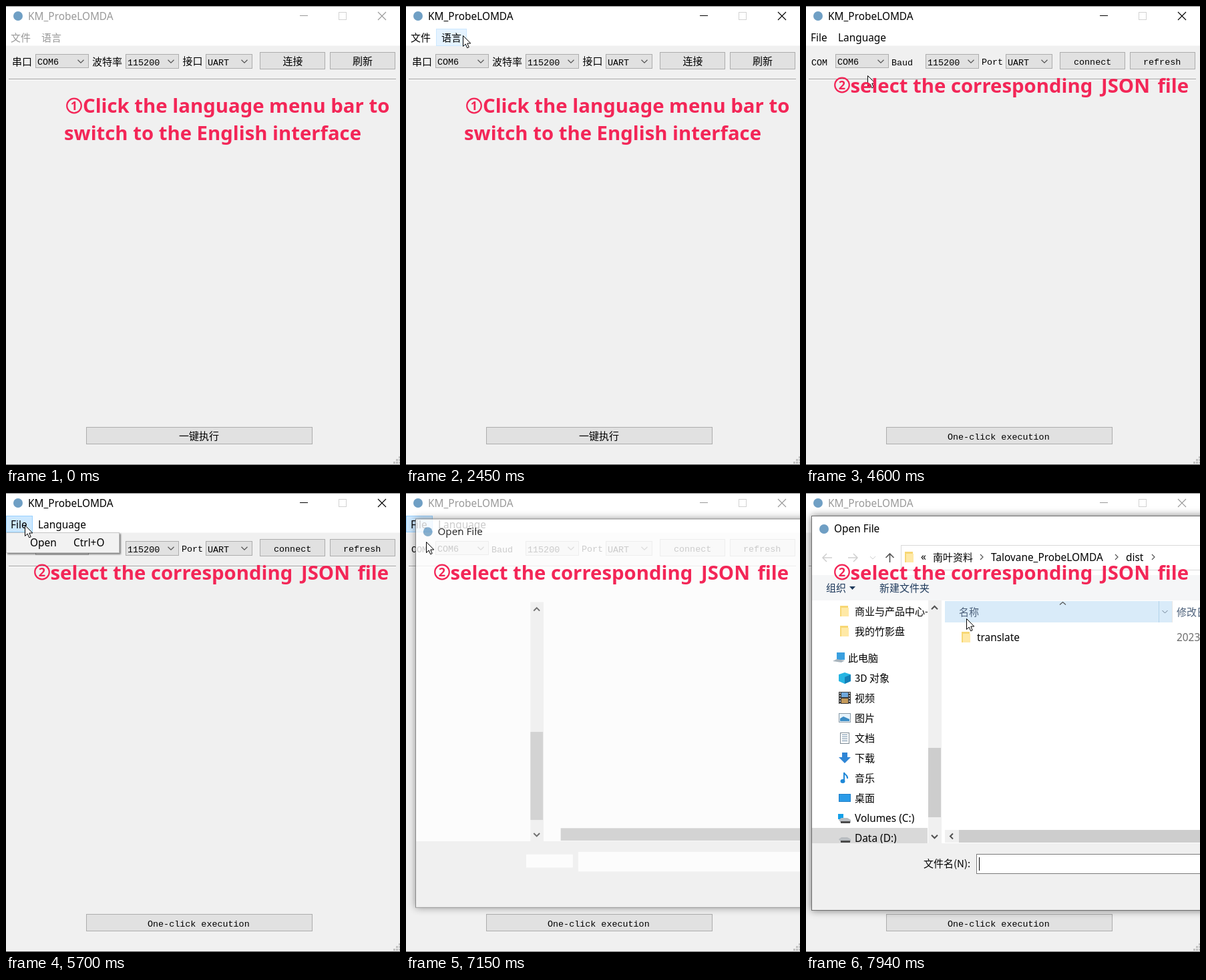
Write an HTML page that moves like this. It is 590 px wide and 688 px high and loops after 8 s.

```html
<!DOCTYPE html>
<html lang="zh-CN">
<head>
<meta charset="utf-8">
<title>Serial tool walkthrough</title>
<style>
  html, body { margin: 0; width: 100%; height: 100%; overflow: hidden; background: #f0f0f0; }
  svg { display: block; width: 590px; height: 688px; }
  text { font: 15.4px 'Noto Sans', 'Noto Sans CJK SC', sans-serif; white-space: pre; }
  .zh { font: 15px 'Noto Sans CJK SC', 'Noto Sans', sans-serif; }
  .mono { font: 13.4px 'Liberation Mono', monospace; }
  .cap, .cap text { font: bold 29.3px 'Noto Sans', sans-serif; fill: #f32657; }
  .cap .num { font-size: 18px; text-anchor: middle; }
  .cap circle { fill: none; stroke: #f32657; stroke-width: 2.2; }
  .btn { fill: #e1e1e1; stroke: #adadad; }
  .btn.hot { fill: #e5f1fb; stroke: #0078d7; }
  .pop { fill: #f2f2f2; stroke: #c4c4c4; filter: drop-shadow(2px 2px 1px rgba(0,0,0,.45)); }
  .item { fill: #91c9f7; }
  .line { fill: none; stroke: #555; stroke-width: 1.2; }
  .pane { fill: #fff; stroke: #6e6e6e; filter: drop-shadow(0 0 6px rgba(0,0,0,.5)); }
</style>
</head>
<body>
<svg id="stage" viewBox="0 0 590 688"></svg>
<script>
const LOOP = 8000;
const $ = id => document.getElementById(id);

// Markup helpers
const rect = (x, y, w, h, attr = '') => `<rect x="${x}" y="${y}" width="${w}" height="${h}" ${attr}/>`;
const box = (x, y, w, h, attr) => rect(x + .5, y + .5, w - 1, h - 1, attr);
const text = (x, y, s, cls = '', attr = '') => `<text x="${x}" y="${y}" class="${cls}" ${attr}>${s}</text>`;
const path = (d, attr = 'class="line"') => `<path d="${d}" ${attr}/>`;
const group = (id, body, attr = '') => `<g id="${id}" ${attr}>${body}</g>`;
const dot = (x, y) => `<circle cx="${x}" cy="${y}" r="7" fill="#6f9fc4"/>`;
const chev = (x, y, dx, dy, attr) => dy
  ? path(`M${x - dx} ${y - dy / 2}l${dx} ${dy}l${dx} ${-dy}`, attr)
  : path(`M${x - dx / 2} ${y - Math.abs(dx)}l${dx} ${Math.abs(dx)}l${-dx} ${Math.abs(dx)}`, attr);
const fill = c => `fill="${c}"`;
const folder = (x, y) => rect(x, y, 12, 16, fill('#f7d774')) + rect(x + 2, y + 3, 11, 13, fill('#ffe9a6'));

const combos = [[44, 72, 80, 21], [179, 72, 80, 22], [299, 72, 70, 22]];
const combo = ([x, y, w, h], i) => box(x, y, w, h, `id="combo${i}" class="btn"`) + chev(x + w - 12, 83, 4.5, 4.5);

function grip() {
  let s = '';
  for (let r = 0; r < 3; r++)
    for (let c = 2 - r; c < 3; c++) s += rect(580 + c * 4, 675 + r * 4, 3, 3, fill('#c2c2c2'));
  return s;
}

const mainWindow = () =>
  rect(0, 0, 590, 688, fill('#f0f0f0')) + rect(0, 0, 590, 59.5, fill('#fff')) +
  rect(0, 0, 590, 1, fill('#8a8a8a')) + rect(0, 687, 590, 1, 'id="edge"') +
  dot(18, 15) + text(33, 21, 'KM_ProbeLOMDA', '', 'id="title"') +
  path('M440 14.5h12M557 9l12 12m0-12l-12 12', 'id="ctl" fill="none" stroke-width="1.1"') +
  box(498, 9, 12, 12, 'fill="none" stroke="#d2d2d2"') +
  box(45, 34, 46, 26, 'id="hotLang"') + box(0, 34, 40, 25, 'id="hotFile"') +
  path('M4 109.5h580', 'stroke="#a0a0a0"') + path('M4 110.5h580', 'stroke="#fff"') +
  combos.map(combo).join('') +
  [[380, 69, 98], [485, 69, 98], [120, 631, 339]].map(([x, y, w]) => box(x, y, w, 26, 'class="btn"')).join('') +
  text(47, 88, 'COM6', 'mono') + text(182, 89, '115200', 'mono') + text(302, 89, 'UART', 'mono') +
  group('zh',
    group('zhMenu', text(7, 52.7, '文件', 'zh') + text(53, 52.7, '语言', 'zh')) +
    [[9, 88.5, '串口'], [129, 89, '波特率'], [264.5, 88, '接口'], [414.5, 88, '连接'],
     [519, 88, '刷新'], [259, 650, '一键执行']].map(a => text(...a, 'zh')).join('')) +
  group('en',
    text(7, 53, 'File') + text(48, 53, 'Language') +
    [[8, 89, 'COM'], [128, 89, 'Baud'], [263, 88, 'Port'], [401, 88, 'connect'],
     [505, 88, 'refresh'], [212, 650, 'One-click execution']].map(a => text(...a, 'mono')).join('')) +
  grip();

const menus = () =>
  group('langMenu', box(45, 59, 112, 63, 'class="pop"') + rect(48, 62, 106, 28, 'id="item0" class="item"') +
    rect(48, 90, 106, 29, 'id="item1" class="item"') + text(81, 82, '中文', 'zh') + text(81, 110, 'English')) +
  group('fileMenu', box(0, 59, 170, 31, 'class="pop"') + rect(3, 62, 164, 25, 'id="itemOpen" class="item"') +
    text(36, 80, 'Open') + text(101, 80, 'Ctrl+O'));

// Side tree: icon painter at (48, row centre) and label
const drive = y => path(`M49 ${y}l4-3h9l5 3v4h-15z`, fill('#b9bdc1')) + rect(52, y + 2, 14, 3, fill('#4a4a4a'));
const screen = (x, y) => rect(x, y - 6, 18, 12, fill('#1f7fc8')) + rect(x + 1, y - 5, 16, 10, fill('#2b9be8'));
const tree = [
  [177, '商业与产品中心-', y => folder(51, y - 8)],
  [207, '我的竹影盘', y => folder(51, y - 8)],
  [247, '此电脑', y => path(`M46 ${y - 8}h12v11h-12z`, fill('#3aa0e0')) + path(`M40 ${y + 5}l6-3 12 2-5 3z`, fill('#a8b4bd'))],
  [277, '3D 对象', y => path(`M49 ${y - 5}l9-3 9 3v10l-9 4-9-4z`, fill('#27b5e3')) + path(`M58 ${y - 1}l9-4v10l-9 4z`, fill('#1480b8'))],
  [307, '视频', y => rect(49, y - 9, 18, 18, fill('#3a3a3a')) + rect(53, y - 8, 10, 7, fill('#6fa8dc')) + rect(53, y + 1, 10, 7, fill('#c59a5a')) +
    path(`M51 ${y - 8}v17M65 ${y - 8}v17`, 'stroke="#ddd" stroke-width="1.5" stroke-dasharray="2 2"')],
  [337, '图片', y => box(49, y - 7, 18, 14, 'fill="#e8f4fc" stroke="#8a9aa6"') + path(`M51 ${y + 5}v-4l5-3 9 4v3z`, fill('#3c8cc4'))],
  [367, '文档', y => box(51, y - 8, 14, 17, 'fill="#fff" stroke="#7d8a94"') + path(`M54 ${y - 4.5}h8m-8 3h8m-8 3h8m-8 3h8`, 'stroke="#6a8aa4"')],
  [397, '下载', y => path(`M54 ${y - 8}h8v7h5l-9 9-9-9h5z`, fill('#2f86d6'))],
  [427, '音乐', y => path(`M57 ${y + 5}v-13c1 4 6 4 5 9`, 'fill="none" stroke="#1e88d8" stroke-width="2"') +
    `<ellipse cx="55" cy="${y + 5}" rx="3.5" ry="3" fill="#1e88d8"/>`],
  [457, '桌面', y => screen(49, y)],
  [487, 'Volumes (C:)', y => rect(48, y - 6, 8, 8, fill('#14a0e8')) + drive(y + 3)],
  [517, 'Data (D:)', y => drive(y + 2)]
];

const dialog = () => group('dialog',
  box(8, 34, 800, 592, 'class="pane"') + rect(9, 525, 780, 100, fill('#f0f0f0')) +
  dot(27, 54) + text(42, 59, 'Open File') +
  rect(183, 161, 20, 364, fill('#f0f0f0')) + rect(183, 0, 19, 1, 'id="thumb" fill="#cdcdcd"') +
  chev(192.5, 172, 4.5, -4.5, 'fill="none" stroke="#505050" stroke-width="2"') +
  chev(192.5, 515, 4.5, 4.5, 'fill="none" stroke="#505050" stroke-width="2"') +
  rect(229, 505, 370, 19, fill('#cdcdcd')) +
  group('blank', rect(176.5, 545, 71, 20, fill('#fff')) + rect(255.5, 541, 400, 30, fill('#fff'))) +
  group('content',
    path('M39 97h-14m6-6l-6 6 6 6M63 97h14m-6-6l6 6-6 6', 'fill="none" stroke="#cfcfcf" stroke-width="1.5"') +
    chev(100, 97, 4, 4, 'fill="none" stroke="#cfcfcf"') +
    path('M125.500 104v-13m-6 6l6-6 6 6', 'fill="none" stroke="#555" stroke-width="1.6"') +
    box(142, 78, 600, 38, 'fill="#fff" stroke="#d9d9d9"') + folder(148, 88) +
    text(172, 101, '«') + text(190, 102, '南叶资料', 'zh') + text(277, 102, 'Talovane_ProbeLOMDA') + text(479, 102, 'dist') +
    [263, 465, 520].map(x => chev(x, 96, 4, 0)).join('') +
    rect(9, 123, 700, 38, fill('#f5f6f7')) +
    text(30, 148, '组织', 'zh', fill('#1e395b')) + path('M65 140h9l-4.500 5z', fill('#1e395b')) +
    text(110, 148, '新建文件夹', 'zh', fill('#1e395b')) +
    rect(9, 502, 173, 23, fill('#d9d9d9')) +
    `<g clip-path="url(#side)">` + tree.map(([y, s, icon], i) =>
      icon(y) + text(i === 2 ? 63 : 73, y + 5.6, s, /[a-z]/.test(s) ? '' : 'zh')).join('') + '</g>' +
    group('hotHead', rect(208, 162, 340, 32, fill('#d9ebf9')) + path('M528.500 162v32', 'stroke="#b3d3ea"') +
      chev(537.5, 178, 4, 4, 'fill="none" stroke="#6d7f92"')) +
    chev(384.5, 165.5, 4.5, -4, 'class="line"') + path('M548.500 162v32', 'stroke="#e5e5e5"') +
    text(229, 184, '名称', 'zh', fill('#4c607a')) + text(555, 184, '修改日期', 'zh', fill('#4c607a')) +
    folder(233, 208) + text(256, 222, 'translate') + text(555, 222, '2023', '', fill('#6d6d6d')) +
    rect(208, 505, 21, 19, fill('#f0f0f0')) + chev(218, 514.5, -4, 0, 'fill="none" stroke="#505050" stroke-width="2"') +
    text(176, 561, '文件名(N):', 'zh') + box(255, 541, 500, 30, 'fill="#fff" stroke="#7a7a7a"') +
    rect(259, 546, 1, 20)));

const badge = (x, y, n) => `<circle cx="${x}" cy="${y}" r="10.8"/>` + text(x, y + 6.5, n, 'num');
const captions = () =>
  group('cap1', badge(102, 149.5, 1) + text(115, 160, 'Click the language menu bar to') +
    text(87, 201, 'switch to the English interface'), 'class="cap"') +
  group('cap2', badge(54, 118.5, 2) + text(66.5, 129.5, 'select the corresponding') +
    text(442, 129.5, 'JSON') + text(526.5, 129.5, 'file'), 'class="cap"');

$('stage').innerHTML = `<clipPath id="side">${rect(9, 161, 173, 364)}</clipPath>` +
  mainWindow() + menus() + dialog() +
  group('cursor', path('M.5.5V16.500L4.200 13l2.500 5.800 2.500-1.100L6.800 12h5z', 'fill="#fff" stroke="#000"')) + captions();

// Pointer moves: start, end, x, y, ease-out power; sampled every 70 ms
const moves = [
  [550, 1110, 179, 103, 1.15], [1110, 1250, 118, 76, 1], [1250, 1320, 112, 66, 1],
  [1320, 1880, 85, 44, 1.5], [3180, 3600, 92, 104, 1.3], [4790, 5420, 28, 48, 1.3],
  [5830, 6040, 30, 73, 1], [7370, 7790, 239, 188, 1.6], [7870, 7940, 240, 188, 1]
];
const stepped = (t, a, b, n) => Math.min(1, Math.max(0, Math.floor((t - a) / (b - a) * n + 1e-6) / n));

function pointer(t) {
  let x = 577, y = 649;
  for (const [a, b, tx, ty, p] of moves) {
    if (t < a) break;
    const e = 1 - (1 - stepped(t, a, b, Math.round((b - a) / 70))) ** p;
    x += (tx - x) * e;
    y += (ty - y) * e;
  }
  return [Math.round(x), Math.round(y)];
}

const show = (id, on) => { $(id).style.display = on ? '' : 'none'; };
const within = (t, a, b) => t >= a && t < b;
const grey = v => `rgb(${v},${v},${v})`;

function tab(id, open, hover) {
  show(id, open || hover);
  $(id).setAttribute('fill', open ? '#cce8ff' : '#e5f3ff');
  $(id).setAttribute('stroke', open ? '#99d1ff' : '#cce8ff');
}

function draw(t) {
  const [x, y] = pointer(t);
  show('cursor', t >= 550);
  $('cursor').setAttribute('transform', `translate(${x} ${y})`);

  // Window focus
  const wake = stepped(t, 2030, 2450, 6), focus = wake - stepped(t, 6303, 6570, 4);
  const ink = grey(Math.round(153 * (1 - focus)));
  $('title').setAttribute('fill', ink);
  $('ctl').setAttribute('stroke', ink);
  $('zhMenu').setAttribute('fill', grey(Math.round(153 * (1 - wake))));
  $('edge').setAttribute('fill', grey(Math.round(120 - 40 * focus)));

  // Language, captions
  show('zh', t < 3940);
  show('en', t >= 3940);
  show('cap1', t < 4600);
  show('cap2', t >= 4600);

  // Menus and hover
  const lang = within(t, 2850, 3870), file = within(t, 5560, 6370), free = t < 7150;
  show('langMenu', lang);
  show('fileMenu', file);
  $('langMenu').setAttribute('opacity', stepped(t, 2780, 2990, 3));
  $('fileMenu').setAttribute('opacity', stepped(t, 5490, 5700, 3));
  show('item0', within(y, 62, 90));
  show('item1', y >= 90);
  show('itemOpen', y >= 62);
  const bar = free && t >= 550 && within(y, 34, 60);
  tab('hotLang', lang, bar && within(x, 45, 91));
  tab('hotFile', within(t, 5560, 7220), bar && x < 40);
  combos.forEach(([cx, cy, w, h], i) => $('combo' + i).classList.toggle('hot',
    free && t >= 550 && !lang && !file && within(x, cx, cx + w) && within(y, cy, cy + h)));

  // File dialog
  const grow = stepped(t, 7150, 7290, 2), ready = t >= 7290;
  const scale = .985 + .015 * grow ** .5;
  show('dialog', !free);
  $('dialog').setAttribute('opacity', .8 + .2 * grow ** .5);
  $('dialog').setAttribute('transform', `translate(408 330) scale(${scale}) translate(-408 -330)`);
  show('blank', !ready);
  show('content', ready);
  $('thumb').setAttribute('y', ready ? 382 : 358.5);
  $('thumb').setAttribute('height', ready ? 104 : 134);
  show('hotHead', within(y, 162, 194) && within(x, 208, 548));
}

function tick() {
  draw(performance.now() % LOOP);
  requestAnimationFrame(tick);
}
tick();
</script>
</body>
</html>
```
